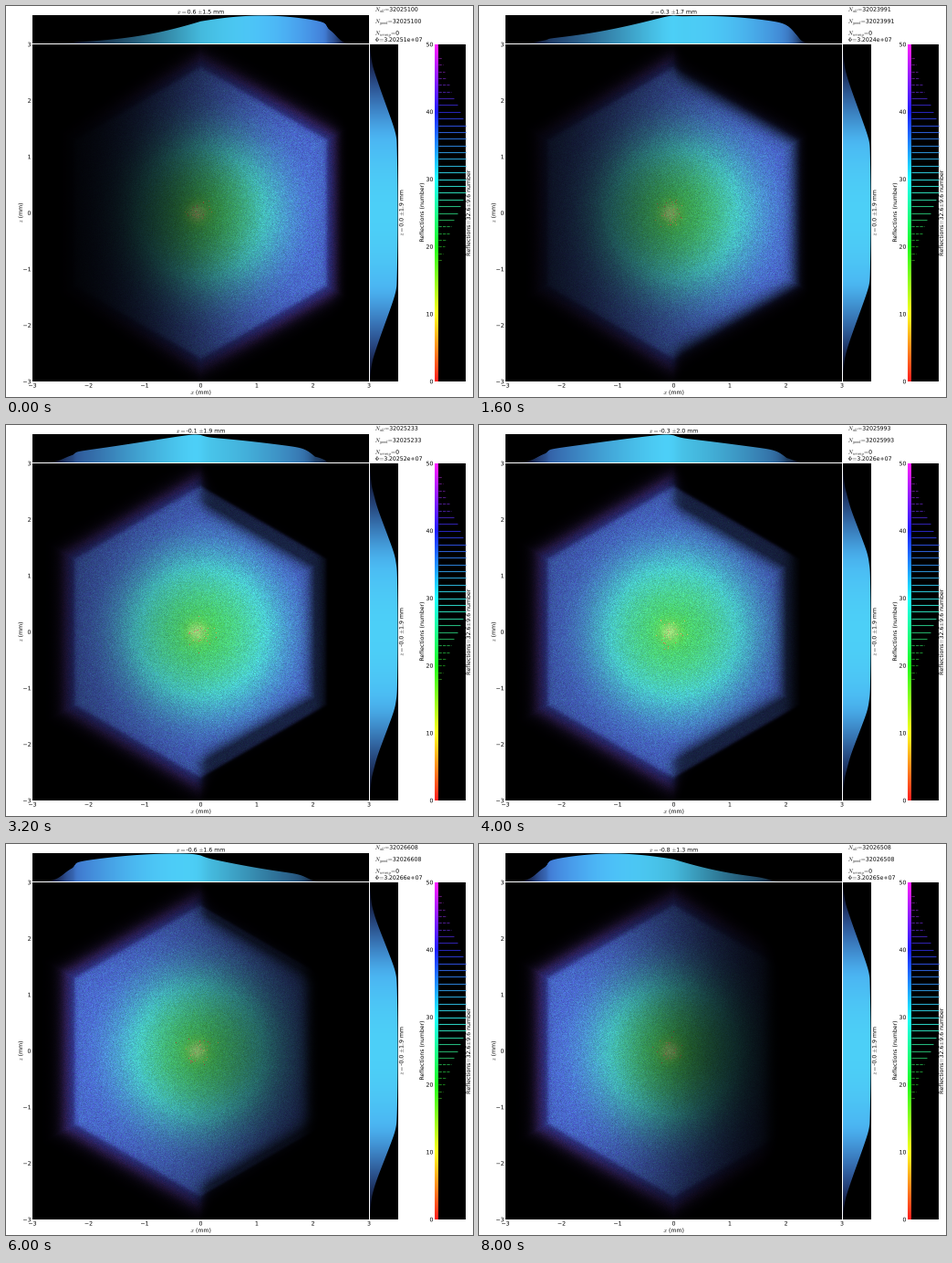
Write a matplotlib script that moves like this. It is 512 px wide and 428 px high and loops after 8.2 s.

```python
import numpy as np
import matplotlib.pyplot as plt
from matplotlib.animation import FuncAnimation
from matplotlib.colors import hsv_to_rgb
from matplotlib.patches import PathPatch
from matplotlib.textpath import TextPath
from matplotlib.transforms import Affine2D

W, H, FRAMES, STEP = 512, 428, 41, 200
SIDE, STRIP = 369, 31          # main panel size, histogram depth
UNIT = SIDE / 6                # pixels per mm
APOTHEM = 2.25                 # of the hexagonal guide, mm
EM = 6.2                       # text size in pixels

plt.rcParams.update({"font.family": "DejaVu Sans", "mathtext.fontset": "cm"})

axis = (np.arange(SIDE) + 0.5) / UNIT - 3
X, Z = np.meshgrid(axis, -axis)
R = np.hypot(X, Z)
D = np.maximum(abs(X), abs(X) / 2 + abs(Z) * np.sqrt(3) / 2)


def fall(d, edge, soft):
    """Smooth drop from 1 to 0 around the edge."""
    return 0.5 - 0.5 * np.tanh((d - edge) / (2 * soft))


def smooth(t):
    t = np.clip(t, 0, 1)
    return t * t * (3 - 2 * t)


def paint(h, s, v):
    hsv = np.stack(np.broadcast_arrays(np.mod(h / 360, 1), s, v), -1)
    return hsv_to_rgb(np.clip(hsv, 0, 1))


INSIDE = fall(D, APOTHEM, 0.015)
RIGHT = fall(-X, 0, 0.06)
CORE = np.exp(-((X + 0.07) ** 2 + Z ** 2) / 0.04)
HUE = 130 + 95 * smooth(R / 2.2) + 35 * smooth((D - 2.15) / 0.35)
SAT = 0.64 - 0.2 * CORE


def intensity(i):
    """A broad glow sweeps from right to left behind the hexagon."""
    phase = np.pi * i / (FRAMES - 1)
    centre = np.clip(3 * np.cos(phase), -1.9, 1.9)
    width = 1.65 + 1.6 * np.sin(phase) ** 2
    glow = 0.83 * np.exp(-((X - centre) / width) ** 2 / 2)

    left = fall(D, 2.42, 0.08)
    right = fall(D, 2.42 - 0.45 * np.sin(phase), 0.08)
    right = np.maximum(right, 0.35 * INSIDE) * fall(X, 2.5 - 0.02 * i, 0.07)
    mask = left + (right - left) * RIGHT
    return glow * (1 - 0.025 * Z ** 2) * mask * (0.72 + 0.28 * INSIDE)


def hexagon(v, i):
    rng = np.random.default_rng(100 + i)
    v = (v + 0.04 * CORE) * (1 + 0.05 * rng.standard_normal(X.shape))
    h = HUE - 30 * CORE + 4 * rng.standard_normal(X.shape)
    spark = rng.random(X.shape) < 0.06 * CORE
    return paint(np.where(spark, rng.uniform(0, 60, X.shape), h), SAT, v)


def histogram(v, along):
    """Coloured bars growing upward, one per pixel of the other axis."""
    height = (v ** 0.85).sum(along)
    height /= height.max()
    level = np.arange(STRIP)[::-1, None]
    cover = np.clip(height * (STRIP - 0.5) - level, 0, 1)
    bars = paint(194 + 4.5 * axis ** 2, 0.69, 0.97 * np.sqrt(height))
    return bars * cover[..., None]


def pictures(i):
    v = intensity(i)
    side = histogram(v, 1).transpose(1, 0, 2)[:, ::-1]
    return hexagon(v, i), histogram(v, 0), side


fig = plt.figure(figsize=(W / 100, H / 100), dpi=100, facecolor="white")
ax = fig.add_axes([0, 0, 1, 1])


def panel(data, x, y, w=None):
    h = data.shape[0]
    w = w or data.shape[1]
    return ax.imshow(data, extent=(x, x + w, y + h, y), aspect="auto",
                     interpolation="nearest")


class Label:
    """Text as outlines, so small type keeps its exact place."""

    def __init__(self, x, y, s=" ", align=0.5, turn=0):
        self.x, self.y, self.align, self.turn = x, y, align, turn
        self.patch = ax.add_patch(PathPatch(self.outline(s), fc="black", lw=0))

    def outline(self, s):
        path = TextPath((0, 0), str(s), size=EM)
        if not len(path.vertices):
            return path
        box = path.get_extents()
        shift = -box.x0 - self.align * box.width
        place = (Affine2D().translate(shift, 0).scale(1, -1)
                 .rotate_deg(-self.turn).translate(self.x, self.y))
        return place.transform_path(path)

    def set(self, s):
        self.patch.set_path(self.outline(s))


main, top, side = (panel(data, x, y) for data, x, y in
                   zip(pictures(0), (29, 29, 399), (42, 10, 42)))

# Reflection scale and its distribution
panel(np.zeros((SIDE, 34, 3)), 470, 42)
panel(paint(np.linspace(300, 0, SIDE)[:, None], 0.88, 1.0), 470, 42, 3.5)
for n in range(18, 49):
    size = min(1, 1.3 * np.exp(-((n - 33) / 10) ** 2))
    y = 411 - n * SIDE / 50
    ax.plot([474, 474 + 30 * size], [y, y], lw=0.8,
            color=paint(n * 6, 0.8, 0.35 + 0.45 * size),
            ls="-" if size > 0.56 else (0, (3, 1)), solid_capstyle="butt")

for n in range(-3, 4):
    text = str(n).replace("-", "\u2212")
    Label(213.5 + n * UNIT, 417.5, text)
    Label(27, 228.8 - n * UNIT, text, align=1)
for n in range(0, 51, 10):
    Label(468, 413.3 - n * SIDE / 50, n, align=1)

Label(213.5, 425, "$x$ (mm)")
Label(18, 226.5, "$z$ (mm)", turn=90)
Label(458, 226, "Reflections (number)", turn=90)
Label(509, 226.5, r"Reflections$\!=\!$32.6$\pm$9.6 number", turn=90)
Label(405, 31.7, r"$N_{wrong}\!=\!$0", align=0)
title = Label(213.5, 8.5)
side_title = Label(435.5, 226.5, turn=90)
n_all, n_good, flux = (Label(405, y, align=0) for y in (5.8, 18.8, 39))

ax.set_xlim(0, W)
ax.set_ylim(H, 0)
ax.axis("off")

# Readings along the sweep
TURNS = [0, 20, 34, 40]
MEAN = [0.62, -0.28, -0.7, -0.8]
SPREAD = [1.5, 2.0, 1.4, 1.3]
COUNT_AT = [0, 8, 16, 20, 26, 34, 40]
EXTRA = [5100, 3991, 5233, 5993, 6771, 6446, 6508]


def update(i):
    for image, data in zip((main, top, side), pictures(i)):
        image.set_data(data)
    mean, spread = np.interp(i, TURNS, MEAN), np.interp(i, TURNS, SPREAD)
    n = 32020000 + round(np.interp(i, COUNT_AT, EXTRA))
    title.set(rf"$x=${mean:.1f} $\pm${spread:.1f} mm")
    side_title.set(rf"$z=${0.01 * (13 - i) / 13:.1f} $\pm$1.9 mm")
    n_all.set(rf"$N_{{all}}\!=\!${n}")
    n_good.set(rf"$N_{{good}}\!=\!${n}")
    flux.set(rf"$\Phi\!=\!${n:g}")


anim = FuncAnimation(fig, update, frames=FRAMES, interval=STEP, repeat=True,
                     repeat_delay=0, blit=False)
plt.show()
```
